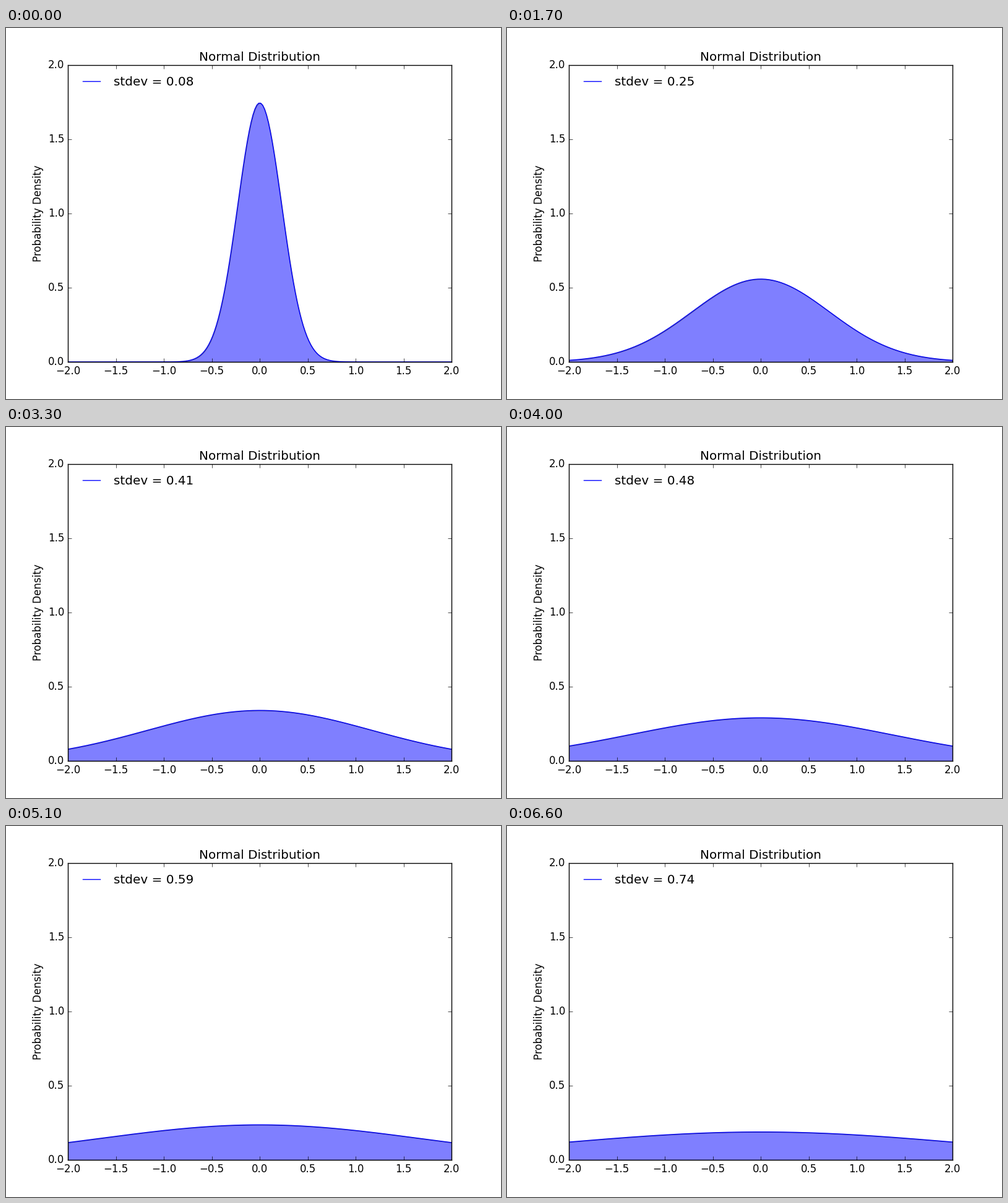
Animation of 800x600 px, one loop 6700 ms. Source, as a matplotlib script:

```python
import numpy as np
import matplotlib.pyplot as plt
from matplotlib.animation import FuncAnimation

FRAMES = 67
INTERVAL = 100
SCALE = 0.35  # stdev shown per unit of curve width

plt.style.use("classic")
plt.rcParams["font.family"] = "DejaVu Sans"

x = np.linspace(-2, 2, 200)


def density(stdev):
    sigma = stdev / SCALE
    return np.exp(-0.5 * (x / sigma) ** 2) / (sigma * np.sqrt(2 * np.pi))


def fill(y):
    return ax.fill_between(x, 0, y, facecolor="blue", edgecolor="black",
                           linewidth=1, alpha=0.5)


fig, ax = plt.subplots(figsize=(8, 6), dpi=100, facecolor="white")
ax.set(xlim=(-2, 2), ylim=(0, 2), title="Normal Distribution",
       ylabel="Probability Density")
ax.set_xticks(np.arange(-2, 2.1, 0.5))
ax.set_yticks(np.arange(0, 2.1, 0.5))

line, = ax.plot(x, density(0.08), color="blue", lw=1, label="stdev = 0.08")
legend = ax.legend(loc="upper left", frameon=False)
label = legend.get_texts()[0]
area = fill(density(0.08))


def update(i):
    global area
    stdev = 0.08 + 0.01 * i
    y = density(stdev)
    line.set_ydata(y)
    area.remove()
    area = fill(y)
    label.set_text(f"stdev = {stdev:.2f}")
    return line, area, label


anim = FuncAnimation(fig, update, frames=FRAMES, interval=INTERVAL,
                     init_func=lambda: update(0), repeat=True,
                     repeat_delay=0, blit=False)
plt.show()
```
